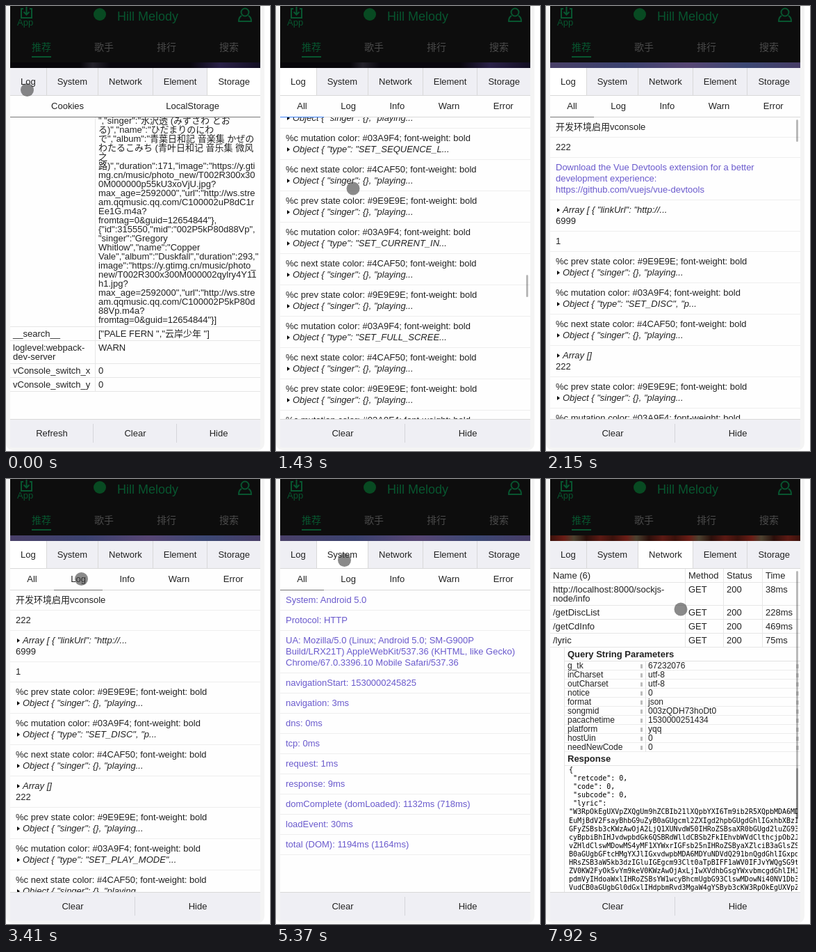
An HTML page that plays this animation: 380 by 639 pixels, repeating every 8 s.

```html
<!DOCTYPE html>
<html lang="en">
<head>
<meta charset="utf-8">
<title>Mobile console panel</title>
<style>
html, body { margin: 0; width: 100%; height: 100%; overflow: hidden; background: #fff; }
body { position: relative; font: 13px/16px "Liberation Sans", "Noto Sans CJK SC", "Noto Sans CJK JP", "Noto Sans CJK", sans-serif; color: #222; }
div, span, svg { box-sizing: border-box; }
.abs, .abs > svg { position: absolute; }
#shell { left: 0; top: -20px; width: 372px; height: 658px; border-radius: 10px; background: #f4f4f4; }
#phone { left: 6px; top: 0; width: 360px; height: 634px; overflow: hidden; background: #fefefe; }
#head { left: 0; top: 0; width: 360px; height: 81px; background: #0d0d0d; color: #08552f; }
#head span { position: absolute; white-space: nowrap; }
#head .nav { top: 50px; width: 90px; text-align: center; font-size: 14px; line-height: 18px; color: #4b4b4b; }
#head .nav.on { color: #08552f; }
#head .nav.on::after { content: ""; position: absolute; left: 31px; top: 22px; width: 28px; height: 2px; background: #08552f; }
#strip { left: 0; top: 81px; width: 1080px; height: 8px; display: flex; }
#strip div { width: 360px; }
#tabs { left: 0; top: 89px; width: 360px; height: 40px; display: flex; overflow: hidden; background: #efeff4; border-bottom: 1px solid #d9d9d9; line-height: 39px; }
#tabs div { padding: 0 15px; border-right: 1px solid #d9d9d9; }
#tabs .on { background: #fff; }
.subs { left: 0; top: 129px; width: 360px; height: 31px; display: flex; line-height: 30px; text-align: center; }
.subs div { flex: 1 1 auto; border-bottom: 1px solid #d9d9d9; }
.subs .on { border-color: var(--ink, #777); }
.subs .tap { background: #f6f6fd; }
.view { left: 0; top: 160px; width: 360px; height: 433px; overflow: hidden; }
.list { display: flex; flex-direction: column; min-height: 433px; }
.item { flex: none; padding: 6px 8px; border-bottom: 1px solid #eee; white-space: pre; }
.info { color: #6a5acd; }
.obj { font-style: italic; padding-left: 10px; position: relative; }
.obj::before { content: ""; position: absolute; left: 2px; top: 5px; border: solid transparent; border-width: 3.5px 0 3.5px 4px; border-left-color: #000; }
.list[data-filter=Log] .info, .list[data-filter=Info] .log, .list[data-filter=Warn] .item, .list[data-filter=Error] .item { display: none; }
.cmd { flex: none; margin-top: auto; height: 41px; display: flex; border-top: 1px solid #d9d9d9; line-height: 40px; }
.cmd span { flex: 1; padding-left: 8px; font: 9.7px/37px "Liberation Mono", monospace; color: #444; }
.cmd div { width: 40px; text-align: center; background: #efeff4; }
.row { display: flex; line-height: 13px; border-bottom: 1px solid #e6e6e6; white-space: pre; }
.row div { padding: 3px 4px; border-left: 1px solid #e6e6e6; flex: none; }
.row div:first-child { border-left: 0; }
.detail { margin-left: 20px; border-left: 1px solid #e2e2e2; }
.detail b { display: block; padding: 3px 4px; line-height: 13px; border-bottom: 1px solid #e2e2e2; }
.pair { position: relative; height: 13px; padding-left: 4px; font-size: 12px; line-height: 13px; border-bottom: 1px solid #ececec; }
.pair span { position: absolute; left: 116px; padding-left: 3px; border-left: 1px solid #e2e2e2; }
.pair::after, .pair::before { content: ""; position: absolute; left: 109px; top: 4px; width: 3px; height: 6px; background: #bbb; }
.pair::before { left: 333px; width: 4px; opacity: .6; }
.reply { height: 186px; margin-right: 4px; overflow: hidden; padding-left: 6px; font: 10px/12.1px "DejaVu Sans Mono", monospace; color: #000; white-space: pre; }
#bottom { left: 0; top: 593px; width: 360px; height: 41px; display: flex; background: #efeff4; border-top: 1px solid #d9d9d9; line-height: 39px; text-align: center; }
#bottom div { flex: 1; position: relative; }
#bottom div + div::before { content: ""; position: absolute; left: -1px; top: 6px; height: 27px; border-left: 1px solid #d5d5da; }
.bar { left: 354px; width: 3px; border-radius: 2px; background: rgba(0, 0, 0, .27); }
#dot { left: -9.5px; top: -9.5px; width: 19px; height: 19px; border-radius: 50%; background: rgba(60, 60, 60, .6); }
</style>
</head>
<body>
<div id="shell" class="abs"></div>
<div id="phone" class="abs">
  <div id="head" class="abs">
    <svg class="abs" width="360" height="40" fill="none" stroke="#08552f" stroke-width="2">
      <path d="M19 4H16V17H31V4H28M23.5 1V12M19.500 8.500L23.500 12.500L27.500 8.500"/>
      <circle cx="129" cy="12" r="9" fill="#084a22" stroke="none"/>
      <circle cx="338" cy="9" r="5.500"/>
      <path d="M333 14Q329 16 329 22H347Q347 16 343 14"/>
    </svg>
    <span style="left:10px;top:16px">App</span>
    <span style="left:154px;top:4px;font-size:18px;line-height:22px">Hill Melody</span>
  </div>
  <div id="strip" class="abs">
    <div style="background:linear-gradient(90deg,#07060a 0 28%,#24222b 33%,#09070e 40% 72%,#2a2148 84%,#120e22)"></div>
    <div style="background:linear-gradient(90deg,#494068,#3b426f 30%,#574674 55%,#3c4874 78%,#463c66)"></div>
    <div style="background:repeating-linear-gradient(90deg,#3a120c 0,#6a1d16 20px,#4d4230 34px,#2b0f0b 52px,#5c1a14 72px,#3a120c 90px)"></div>
  </div>
  <div id="tabs" class="abs"></div>
  <div id="panel"></div>
  <div id="bottom" class="abs"></div>
</div>
<div id="dot" class="abs"></div>
<script>
const LOOP = 8000, TRIPLES = 41, VIEW_H = 433;
const BLUE = '#3e82f7', GREY = '#777';
const $ = id => document.getElementById(id);
const esc = s => s.replace(/&/g, '&amp;').replace(/</g, '&lt;');
const div = (cls, html) => `<div class="${cls}">${html}</div>`;
const cells = (names, on) => names.map(n => div(n === on || on === true ? 'on' : '', n)).join('');
const item = (lines, cls = 'log') => div('item ' + cls, lines.map(l =>
  /^(Object|Array)/.test(l) ? div('obj', esc(l)) : `<div>${esc(l)}</div>`).join(''));
const row = (texts, widths) => div('row', texts.map((t, i) =>
  `<div style="width:${widths[i]}px">${esc(t)}</div>`).join(''));

const TABS = ['Log', 'System', 'Network', 'Element', 'Storage'];
const FILTERS = ['All', 'Log', 'Info', 'Warn', 'Error'];

['推荐', '歌手', '排行', '搜索'].forEach((n, i) => $('head').insertAdjacentHTML('beforeend',
  `<span class="nav ${i ? '' : 'on'}" style="left:${i * 90}px">${n}</span>`));

// Log entries
const styled = (what, color, detail) => item([`%c ${what} color: ${color}; font-weight: bold`, `Object { ${detail}...`]);
const state = '"singer": {}, "playing';
const triple = type => styled('prev state', '#9E9E9E', state) +
  styled('mutation', '#03A9F4', `"type": "SET_${type}`) + styled('next state', '#4CAF50', state);
const mutations = ['SEQUENCE_L', 'CURRENT_IN', 'FULL_SCREE', 'PLAYING_ST'];
let logItems = item(['开发环境启用vconsole']) + item(['222']) +
  item(['Download the Vue Devtools extension for a better', 'development experience:', 'https://github.com/vuejs/vue-devtools'], 'info') +
  item(['Array [ { "linkUrl": "http://...', '6999']) + item(['1']) + triple('DISC", "p') + item(['Array []', '222']);
for (let i = 0; i < TRIPLES; i++) logItems += triple(i ? mutations[i % 4] : 'PLAY_MODE"');
const logView = div('abs view', `<div class="list" id="list">${logItems}<div class="cmd"><span>command...</span><div>OK</div></div></div>`) +
  '<div class="abs bar" id="thumb" style="height:32px"></div>';

// System facts
const systemView = div('abs view', [
  ['System: Android 5.0'], ['Protocol: HTTP'],
  ['UA: Mozilla/5.0 (Linux; Android 5.0; SM-G900P', 'Build/LRX21T) AppleWebKit/537.36 (KHTML, like Gecko)', 'Chrome/67.0.3396.10 Mobile Safari/537.36'],
  ['navigationStart: 1530000245825'], ['navigation: 3ms'], ['dns: 0ms'], ['tcp: 0ms'], ['request: 1ms'], ['response: 9ms'],
  ['domComplete (domLoaded): 1132ms (718ms)'], ['loadEvent: 30ms'], ['total (DOM): 1194ms (1164ms)']
].map(l => item(l, 'info')).join(''));

// Network requests
const lyric = btoa(('[ti:A Quiet Road Home]\n[ar:Nobody]\n[00:01.20]Walk along the river while the lamps are low\n' +
  '[00:06.45]Count the little windows in a row\n').repeat(5));
const quoted = '"' + lyric;
const reply = ['{', ' "retcode": 0,', ' "code": 0,', ' "subcode": 0,', ' "lyric":',
  ...Array.from({ length: 10 }, (_, i) => quoted.slice(i * 55, i * 55 + 55))].join('\n');
const params = { g_tk: '67232076', inCharset: 'utf-8', outCharset: 'utf-8', notice: 0, format: 'json', songmid: '003zQDH73hoDt0',
  pacachetime: '1530000251434', platform: 'yqq', hostUin: 0, needNewCode: 0 };
const netRows = [['Name (6)', 'Method', 'Status', 'Time'], ['http://localhost:8000/sockjs-\nnode/info', 'GET', '200', '38ms'],
  ['/getDiscList', 'GET', '200', '228ms'], ['/getCdInfo', 'GET', '200', '469ms'], ['/lyric', 'GET', '200', '75ms']]
  .map(r => row(r, [194, 55, 56, 55])).join('');
const networkView = `<div class="abs view" style="top:129px;height:464px">${netRows}<div class="detail" id="detail">
  <b>Query String Parameters</b>${Object.entries(params).map(([k, v]) => div('pair', `${k}<span>${v}</span>`)).join('')}
  <b>Response</b><div class="reply">${reply}</div></div></div>
  <div id="netBars"><div class="abs bar" style="top:132px;height:356px"></div>
  <div class="abs bar" style="top:415px;height:73px"></div></div>`;

// Stored values
const songs = `","singer":"水沢透 (みずさわ とお
る)","name":"ひだまりのにわ
で","album":"青葉日和記 音楽集 かぜの
わたるこみち (青叶日和记 音乐集 微风
之
路)","duration":171,"image":"https://y.gti
mg.cn/music/photo_new/T002R300x30
0M000000p55kU3xoVjU.jpg?
max_age=2592000","url":"http://ws.stre
am.qqmusic.qq.com/C100002uP8dC1r
Ee1G.m4a?
fromtag=0&guid=12654844"},
{"id":315550,"mid":"002P5kP80d88Vp",
"singer":"Gregory
Whitlow","name":"Copper
Vale","album":"Duskfall","duration":293,"
image":"https://y.gtimg.cn/music/photo_
new/T002R300x300M000002qylry4Y11
h1.jpg?
max_age=2592000","url":"http://ws.stre
am.qqmusic.qq.com/C100002P5kP80d
88Vp.m4a?
fromtag=0&guid=12654844"}]`;
const storageView = div('abs view', '<div style="margin-top:-5px">' + [['', songs], ['__search__', '["PALE FERN ","云岸少年 "]'],
  ['loglevel:webpack-\ndev-server', 'WARN'], ['vConsole_switch_x', '0'], ['vConsole_switch_y', '0']]
  .map(r => row(r, [122, 238])).join('') + '</div>');

const filterBar = '<div class="abs subs filters"></div>';
const VIEWS = {
  Log: filterBar + logView,
  System: filterBar + systemView,
  Network: networkView,
  Storage: `<div class="abs subs">${cells(['Cookies', 'LocalStorage'], true)}</div>` + storageView
};
$('panel').innerHTML = Object.entries(VIEWS).map(([n, html]) => `<div id="view${n}">${html}</div>`).join('');

// Each step: time, then whatever changes from the step before.
const STEPS = [
  [0, { tab: 'Storage', filter: 'All', ink: GREY, at: [30, 120], scroll: 0, bar: false, slide: 0, tap: '', open: false }],
  [180, { tab: 'Log', ink: BLUE, scroll: 5516 }],
  [350, { at: [40, 130] }],
  [530, { at: [96, 205] }],
  [890, { at: [102, 250], scroll: 5440, bar: true }],
  [1070, { at: [106, 330], scroll: 5000 }],
  [1250, { at: [108, 215], scroll: 4200 }],
  [1430, { at: [110.5, 261.5], scroll: 3102 }],
  [1610, { at: [112, 350], scroll: 1900 }],
  [1790, { at: [112, 240], scroll: 800, slide: .5 }],
  [1970, { at: [112, 330], scroll: 150, slide: .94, ink: GREY }],
  [2150, { at: null, scroll: 0, slide: 1 }],
  [2320, { at: [112, 240] }],
  [2490, { at: [111, 200], bar: false }],
  [2660, { at: [109, 165] }],
  [2840, { at: [108, 147] }],
  [3030, { at: [108, 144], filter: 'Log' }],
  [3410, { at: [108, 143] }],
  [3600, { at: [138, 144] }],
  [3770, { at: [172, 144] }],
  [3930, { at: [174, 144], filter: 'Info' }],
  [4100, { at: [222, 144] }],
  [4280, { at: [252, 144], filter: 'Warn' }],
  [4460, { at: [340, 145], tap: 'Error' }],
  [4630, { filter: 'Error', tap: '' }],
  [4810, { at: [240, 132] }],
  [4990, { at: [118, 114] }],
  [5170, { at: [98, 112], tab: 'System', filter: 'All' }],
  [5370, { at: [98, 116] }],
  [5930, { at: [106, 150], slide: 1.5 }],
  [6110, { at: [122, 170], slide: 1.94 }],
  [6290, { at: [152, 120], slide: 2 }],
  [6460, { at: [163, 114] }],
  [6640, { at: [171, 111] }],
  [6810, { at: [172, 109] }],
  [7370, { tab: 'Network' }],
  [7550, { at: [182, 165] }],
  [7740, { at: [192, 230], open: true }],
  [7920, { at: [193.5, 186.5] }]
];
let last = {};
const frames = STEPS.map(([time, change]) => ({ time, ...(last = { ...last, ...change }) }));
const listHeight = 373 + 135 * TRIPLES + 41;

function show(s) {
  $('tabs').innerHTML = cells(TABS, s.tab);
  for (const name in VIEWS) $('view' + name).style.display = name === s.tab ? '' : 'none';
  for (const bar of document.querySelectorAll('.filters'))
    bar.innerHTML = FILTERS.map(n => div((n === s.filter ? 'on ' : '') + (n === s.tap ? 'tap' : ''), n)).join('');
  $('panel').style.setProperty('--ink', s.ink);
  $('bottom').innerHTML = cells(s.tab === 'Storage' ? ['Refresh', 'Clear', 'Hide'] : ['Clear', 'Hide']);
  $('list').dataset.filter = s.filter;
  $('list').style.transform = `translateY(${-s.scroll}px)`;
  $('thumb').style.display = s.bar ? '' : 'none';
  $('thumb').style.top = 163 + s.scroll * (VIEW_H - 6) / listHeight + 'px';
  $('detail').style.display = $('netBars').style.display = s.open ? '' : 'none';
  $('strip').style.transform = `translateX(${-360 * s.slide}px)`;
  $('dot').style.display = s.at ? '' : 'none';
  if (s.at) $('dot').style.transform = `translate(${s.at[0]}px, ${s.at[1]}px)`;
}

let current;
function tick() {
  const t = performance.now() % LOOP;
  const next = frames.findLast(f => f.time <= t);
  if (next !== current) show(current = next);
  requestAnimationFrame(tick);
}
tick();
</script>
</body>
</html>
```
